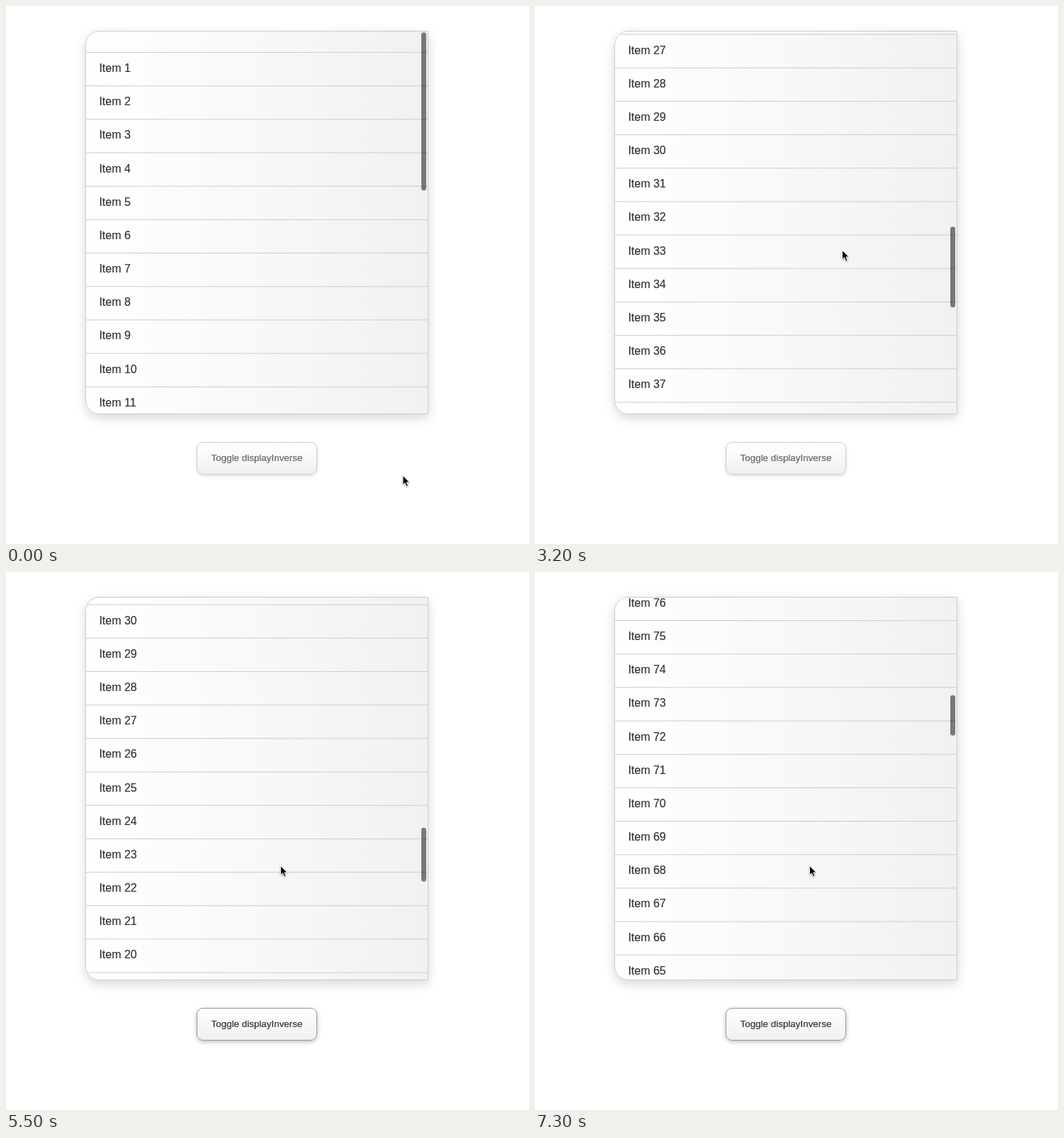
These frames come from a looping animation (738 px wide and 759 px high, 7400 ms). An HTML page:

```html
<!DOCTYPE html>
<html lang="en">
<head>
<meta charset="utf-8">
<title>Infinite list</title>
<style>
html, body { margin: 0; width: 100%; height: 100%; overflow: hidden; background: #fff; }
body { position: relative; font: 16px "Liberation Sans", Arial, sans-serif; }
#list {
  position: absolute; left: 112px; top: 35px; width: 484px; height: 541px;
  box-sizing: border-box; overflow: hidden;
  border: 1px solid #ccc; border-radius: 20px 0 0 20px;
  background: linear-gradient(to right, #fff, #f1f1f1);
  box-shadow: 0 5px 15px rgba(0, 0, 0, .16);
}
.row, #loader { position: absolute; left: 0; top: 0; width: 100%; box-sizing: border-box; }
.row {
  height: 48px; padding-left: 18.4px; border-top: 1px solid #ccc;
  line-height: 44px; white-space: pre; color: #333; -webkit-text-stroke: .2px #333;
}
#loader { height: 74px; color: #777; }
#loader span { position: absolute; left: 225px; top: 31px; line-height: 20px; }
#spinner {
  position: absolute; left: 186px; top: 28px; width: 20px; height: 20px;
  border: 3px solid #ccc; border-left-color: transparent; border-radius: 50%;
}
#thumb {
  position: absolute; left: 472.5px; top: 0; width: 7px;
  border-radius: 3.5px; background: rgba(0, 0, 0, .5);
}
#button {
  position: absolute; left: 269px; top: 615px; width: 170px; height: 46px;
  box-sizing: border-box; border: 1px solid #ccc; border-radius: 9px;
  background: linear-gradient(#fff, #f0f0f0); box-shadow: 0 2px 5px rgba(0, 0, 0, .13);
  font-size: 13.4px; line-height: 44px; text-align: center; white-space: pre;
  color: #666; -webkit-text-stroke: .2px;
}
#button.active { color: #333; border-color: #999; box-shadow: 0 2px 6px rgba(0, 0, 0, .26); }
.cursor {
  position: absolute; left: 0; top: 0; overflow: visible;
  filter: drop-shadow(0 1px 1px rgba(0, 0, 0, .35));
}
#hand { fill: none; stroke-linecap: round; stroke-linejoin: round; }
</style>
</head>
<body>
<div id="list">
  <div id="loader"><div id="spinner"></div><span>Loading...</span></div>
  <div id="thumb"></div>
</div>
<div id="button">Toggle displayInverse</div>
<svg id="arrow" class="cursor" width="12" height="18">
  <path d="M.5 .5V13.5L3.5 10.8L5.6 15.7L7.9 14.7L5.8 9.9H9.9Z" stroke="#fff" stroke-width=".9"/>
</svg>
<svg id="hand" class="cursor" width="16" height="18">
  <path id="fingers" d="M4 2.5L6 11M8 7.5V13M10.3 8V13M12.4 9V13M2.3 10.3L6.5 14.7H11.5" stroke="#000" stroke-width="3.6"/>
  <path d="M4 2.5L6 11M8 7.5V13M10.3 8V13M12.4 9V13M2.3 10.3L6.5 14.7H11.5" stroke="#fff" stroke-width="1.8"/>
</svg>
<script>
const LOOP = 7400, STEP = 100, TOGGLE = 4800, PRESS = 4500;
const PAGE = 25, PITCH = 47.18, PAD = 29, LOADER = 73.3, VIEW = 538.6;
const LOADS = [2900, 4300, 7000];

// Each move: start time, duration, dx, dy
const ORIGIN = [559.5, 662];
const MOVES = [
  [0, 800, 10, -6], [800, 600, -136.5, -312],
  [4000, 500, -98, 299], [4900, 400, 52, -229]
];

const $ = id => document.getElementById(id);
const list = $("list"), loader = $("loader"), thumb = $("thumb");
const move = (el, x, y) => { el.style.transform = `translate(${x}px, ${y}px)`; };
const show = (el, on) => { el.style.visibility = on ? "visible" : "hidden"; };

const rows = Array.from({ length: 13 }, () => {
  const row = document.createElement("div");
  row.className = "row";
  list.insertBefore(row, loader);
  return row;
});

function ease(t, start, duration) {
  const p = Math.min(1, Math.max(0, (t - start) / duration));
  return p * p * (3 - 2 * p);
}

const itemCount = t => PAGE * (1 + LOADS.filter(load => t >= load).length);
const extent = count => PAD + LOADER + count * PITCH;
const bottom = count => extent(count) - VIEW;

function scrollAt(t) {
  const page = PAGE * PITCH;
  if (t < TOGGLE) {
    return bottom(PAGE) * ease(t, 1500, 625) + page * ease(t, LOADS[0], 660.5);
  }
  const inserted = t >= LOADS[2] ? page : 0;
  return bottom(3 * PAGE) * (1 - ease(t, 5300, 556)) + inserted + 41.3 * ease(t, LOADS[2], 300);
}

function drawList(t) {
  const scroll = scrollAt(t), count = itemCount(t);
  const inverse = t >= TOGGLE;
  const start = inverse ? LOADER : PAD;
  const first = Math.max(0, Math.floor((scroll - start) / PITCH));

  // One empty row after the last item draws the closing line.
  rows.forEach((row, i) => {
    const index = first + i;
    const number = inverse ? count - index : index + 1;
    show(row, index <= count);
    row.textContent = index < count ? "Item " + number : "";
    move(row, 0, start + index * PITCH - scroll);
  });

  move(loader, 0, (inverse ? 0 : start + count * PITCH) - scroll);
  $("spinner").style.transform = `rotate(${(t - 6000) * .36 - 45}deg)`;

  const ratio = VIEW / extent(count);
  thumb.style.height = VIEW * ratio - 3.5 + "px";
  move(thumb, 0, 1.3 + scroll * ratio);
}

function drawPointer(t) {
  let [x, y] = ORIGIN;
  for (const [start, duration, dx, dy] of MOVES) {
    const p = ease(t, start, duration);
    x += dx * p;
    y += dy * p;
  }
  const over = x < 439 && y > 615;
  show($("hand"), over);
  show($("arrow"), !over);
  move($(over ? "hand" : "arrow"), x, y);
  $("button").classList.toggle("active", t >= PRESS);
}

function frame() {
  const t = Math.floor(performance.now() % LOOP / STEP) * STEP;
  drawList(t);
  drawPointer(t);
  requestAnimationFrame(frame);
}
frame();
</script>
</body>
</html>
```
